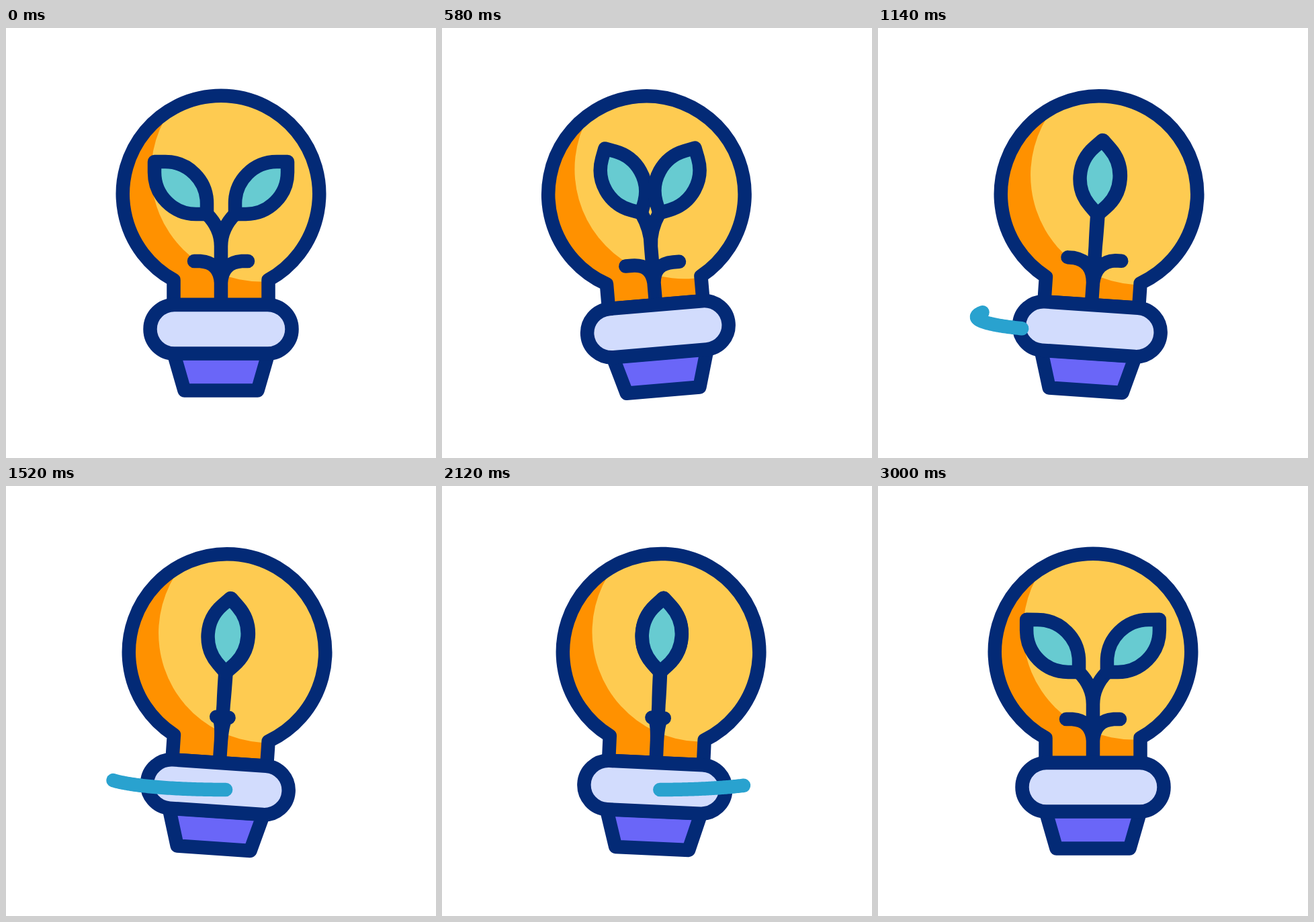
An HTML page that plays this animation: 640x640 px, repeating every 3600 ms.

```html
<!DOCTYPE html>
<html lang="en">
<head>
<meta charset="utf-8">
<title>Growing idea</title>
<style>
html, body { margin: 0; height: 100%; overflow: hidden; background: #fff; }
svg { display: block; width: 100%; height: 100%; }
.line { stroke: #032a76; }
.swirl { stroke: #29a2cf; }
</style>
</head>
<body>
<svg viewBox="0 0 640 640" fill="none" stroke-width="20.5" stroke-linecap="round" stroke-linejoin="round">
  <defs>
    <path id="glass" d="M249.5 412V375A146.2 146.2 0 1 1 390.5 375V412Z"/>
    <clipPath id="inside"><use href="#glass"/></clipPath>
    <path id="leaf" d="M221 199h16a62 62 0 0 1 62 62v16h-16a62 62 0 0 1-62-62z"/>
  </defs>
  <path id="back" class="swirl"/>
  <g id="bulb" class="line">
    <use href="#glass" fill="#ff9100" stroke="none"/>
    <circle cx="379" cy="214.5" r="163" fill="#fecb51" stroke="none" clip-path="url(#inside)"/>
    <use href="#glass"/>
    <path id="stem"/>
    <g id="crown" fill="#67cbd1">
      <use id="left" href="#leaf"/>
      <use id="right" href="#leaf"/>
    </g>
    <path d="M249.5 484L265.5 539.5H374.5L390.5 484Z" fill="#6a66f8"/>
    <rect x="214.5" y="412" width="211" height="72.5" rx="36.25" fill="#d2dcfd"/>
  </g>
  <path id="front" class="swirl"/>
</svg>
<script>
const LOOP = 3600, LAG = 66, RAD = Math.PI / 180;
const $ = id => document.getElementById(id);
const set = (id, name, value) => $(id).setAttribute(name, value);

const linear = (t, from, to) => Math.min(1, Math.max(0, (t - from) / (to - from)));

// Eased step from 0 to 1; bend above 1 delays the middle
function ease(t, from, to, bend = 1) {
  const u = linear(t, from, to) ** bend;
  return u * u * (3 - 2 * u);
}

// Wind up to the left, swing to the right, settle
const tilt = t => -5.5 * ease(t, 220, 680) + 9.4 * ease(t, 680, 1080) - 3.9 * ease(t, 1640, 2900);
const fold = t => 45 * (ease(t, 340, 940) - ease(t, 1980, 3020, 1.4));
const sway = t => 4.45 * (ease(t, 260, 580) - ease(t, 580, 980));
const twigSpan = t => 1 - 0.77 * (ease(t, 1140, 1500) - ease(t, 2600, 2980));

// Fast turns, then slower ones, starting and ending behind the bulb
const spin = t => 2 * Math.PI * (2.5 * linear(t, 664, 1520) + 1.5 * linear(t, 1520, 2323) - 0.25);

function turn([x, y], [cx, cy], deg) {
  const c = Math.cos(deg * RAD), s = Math.sin(deg * RAD);
  return [cx + (x - cx) * c - (y - cy) * s, cy + (x - cx) * s + (y - cy) * c];
}

function stemPath(angle, lean, span, drop) {
  let d = "M320 408V325";
  for (const side of [-1, 1]) {
    const place = (x, y) => turn(turn([320 + side * x, y], [320 + side * 10, 303], -side * angle), [320, 318], lean);
    const twig = x => 320 + side * x * span;
    d += `M${place(21, 277)}Q${place(0, 298)} 320 325`;
    d += `M${twig(40)} ${347 + drop}L${twig(31)} ${347 + drop}Q${twig(2)} ${349 + drop / 2} 320 379`;
  }
  return d;
}

// Part of the ring from tail to head, on its near or far half
function ringPath(tail, head, near) {
  const steps = 60;
  let d = "", drawing = false;
  for (let i = 0; i <= steps && head > tail; i++) {
    const a = tail + (head - tail) * i / steps;
    const visible = Math.sin(a) >= 0 === near;
    if (visible) d += `${drawing ? "L" : "M"}${325 - 178 * Math.cos(a)} ${430 + 22 * Math.sin(a)}`;
    drawing = visible;
  }
  return d;
}

function draw(t) {
  const tip = tilt(t), angle = fold(t), lean = sway(t);
  set("bulb", "transform", `translate(${-0.92 * Math.max(0, tip)}) rotate(${tip} 320 432)`);
  set("crown", "transform", `rotate(${lean} 320 318)`);
  set("left", "transform", `rotate(${angle} 310 303)`);
  set("right", "transform", `translate(640) scale(-1 1) rotate(${angle} 310 303)`);
  set("stem", "d", stemPath(angle, lean, twigSpan(t), -0.8 * tip));
  const head = spin(t), tail = spin(t - LAG);
  set("back", "d", ringPath(tail, head, false));
  set("front", "d", ringPath(tail, head, true));
}

const start = performance.now();
function tick() {
  draw((performance.now() - start) % LOOP);
  requestAnimationFrame(tick);
}
tick();
</script>
</body>
</html>
```
